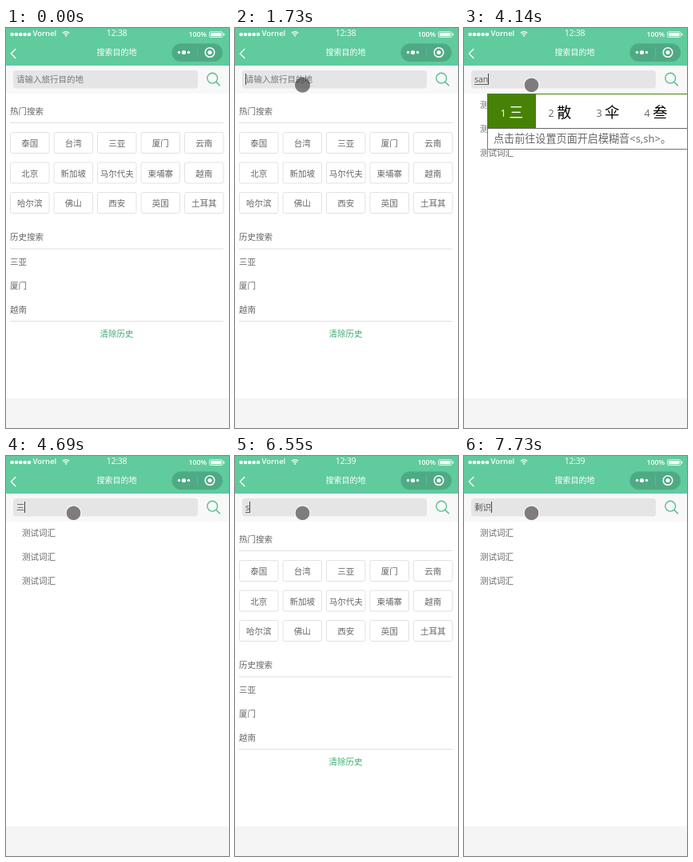
Write an HTML page that moves like this. It is 279 px wide and 500 px high and loops after 8 s.

```html
<!DOCTYPE html>
<html lang="zh-CN">
<head>
<meta charset="utf-8">
<title>搜索目的地</title>
<style>
  html, body { margin: 0; width: 100%; height: 100%; overflow: hidden; background: #fff; }
  svg { display: block; width: 100%; height: 100%; }
  text { font-family: "Open Sans", "Noto Sans CJK SC", "Noto Sans CJK", sans-serif; font-size: 10.5px; fill: #666; }
  .white { fill: #fff; }
  .mid { text-anchor: middle; }
</style>
</head>
<body>
<svg id="stage" viewBox="0 0 279 500"></svg>
<script>
const LOOP = 8000;
const stage = document.getElementById("stage");

function add(parent, tag, attrs = {}, text) {
  const el = document.createElementNS("http://www.w3.org/2000/svg", tag);
  set(el, attrs);
  if (text !== undefined) el.textContent = text;
  parent.appendChild(el);
  return el;
}
function set(el, attrs) {
  for (const key in attrs) el.setAttribute(key, attrs[key]);
}
const group = parent => add(parent, "g");
const rect = (parent, x, y, width, height, fill, more) =>
  add(parent, "rect", { x, y, width, height, fill, ...more });
const dot = (parent, cx, cy, r, more) => add(parent, "circle", { cx, cy, r, fill: "#fff", ...more });
const path = (parent, d, stroke, width, more) =>
  add(parent, "path", { d, stroke, "stroke-width": width, fill: "none", ...more });
const label = (parent, x, y, text, more) => add(parent, "text", { x, y, ...more }, text);
const show = (el, on) => set(el, { visibility: on ? "visible" : "hidden" });

// Page background and header
rect(stage, 0, 0, 279, 500, "#fff");
rect(stage, 0, 463, 279, 37, "#f5f5f5");
rect(stage, 0, 47, 279, 35, "#f8f8f8");
rect(stage, 0, 0, 279, 47, "#60cb9d");

// Status bar
for (let i = 0; i < 5; i++) dot(stage, 7.6 + i * 5.35, 8, 2.3);
label(stage, 33.5, 10.4, "Vornel", { class: "white", style: "font-size:9.5px;font-weight:600" });
path(stage, "M70.8 6.3Q75 2.9 79.2 6.3M72.5 8.1Q75 6.1 77.5 8.1", "#fff", 1.2);
dot(stage, 75, 9.8, 1);
const clock = label(stage, 138.5, 10.2, "", {
  class: "white mid", style: "font-size:10.6px;letter-spacing:-.3px"
});
label(stage, 228.5, 11, "100%", { class: "white", style: "font-size:8.8px;font-weight:600" });
rect(stage, 254.5, 4.7, 16.5, 6.8, "none", { rx: 1.2, stroke: "#fff", "stroke-width": 0.8 });
rect(stage, 256, 6, 13.5, 4.2, "#fff");
rect(stage, 272, 6.7, 1.3, 2.8, "#fff");

// Title bar
path(stage, "M12.3 26L6.3 32L12.3 38", "#fff", 1.3);
label(stage, 138.5, 34.2, "搜索目的地", { class: "white mid", style: "font-size:10px" });
rect(stage, 207.5, 19.5, 63.5, 22.5, "#4eaa84", { rx: 11.25, stroke: "#59b48f", "stroke-width": 0.6 });
path(stage, "M239.5 24V37", "#64b797", 0.8);
dot(stage, 216.5, 30.5, 1.7);
dot(stage, 222.5, 30.5, 2.6);
dot(stage, 228.5, 30.5, 1.7);
dot(stage, 255, 30.5, 5.8, { fill: "none", stroke: "#fff", "stroke-width": 1.5 });
dot(stage, 255, 30.5, 2.6);

// Search field
rect(stage, 9, 53, 231, 22.5, "#e5e5e5", { rx: 4 });
dot(stage, 258.2, 62.7, 6.4, { fill: "none", stroke: "#55bd8d", "stroke-width": 1.4 });
path(stage, "M262.8 67.3L267.8 72.2", "#55bd8d", 1.6);
const placeholder = label(stage, 13, 68, "请输入旅行目的地", { style: "fill:#777" });
const typed = label(stage, 13, 68, "", { style: "fill:#555" });
const underline = path(stage, "", "#555", 0.9);
const caret = rect(stage, 13, 57, 1, 14, "#444");

// Hot and recent searches
const home = group(stage);
const heading = (y, text) => label(home, 5, y, text);
const rule = y => rect(home, 5, y, 267, 1, "#e0e0e0");
heading(107.8, "热门搜索");
rule(118);
"泰国 台湾 三亚 厦门 云南 北京 新加坡 马尔代夫 柬埔寨 越南 哈尔滨 佛山 西安 英国 土耳其"
  .split(" ").forEach((city, i) => {
    const x = 5.5 + (i % 5) * 54.5, y = 130.5 + Math.floor(i / 5) * 37.5;
    rect(home, x, y, 48.5, 26, "#fff", { rx: 2, stroke: "#e2e2e2" });
    label(home, x + 24.2, y + 17.8, city, { class: "mid" });
  });
heading(265.3, "历史搜索");
rule(275.5);
["三亚", "厦门", "越南"].forEach((city, i) => heading(295.5 + i * 30, city));
rule(366);
label(home, 138.5, 386.2, "清除历史", { class: "mid", style: "fill:#3aab70" });

// Suggestions
const results = group(stage);
for (let i = 0; i < 3; i++) label(results, 20, 100.4 + i * 30, "测试词汇");

const pointer = dot(stage, 0, 0, 9.5);

// Input method candidates
const popup = group(stage);
function drawPopup({ x, words, hint }) {
  popup.textContent = "";
  const list = words.split(" ");
  const pitch = 42 + 18 * list[0].length;
  rect(popup, x, 82, 300, 44, "#fff");
  rect(popup, x, 82, 300, 1, "#478206");
  rect(popup, x, 82, pitch + 1, 43, "#478206");
  list.forEach((word, i) => {
    const left = x + i * pitch;
    const num = i ? "#666" : "#fff", ink = i ? "#000" : "#fff";
    label(popup, left + 16.5, 111, i + 1, { style: `font-size:12.5px;fill:${num}` });
    label(popup, left + 27.3, 111.5, word, { style: `font-size:18px;fill:${ink}` });
  });
  if (hint) {
    rect(popup, x + 0.5, 125.5, 300, 26, "#fff", { stroke: "#777" });
    label(popup, x + 8, 143.2, "点击前往设置页面开启模糊音<s,sh>。", { style: "font-size:13.1px;fill:#666" });
  }
  rect(popup, x, 125, 300, 1, "#666");
}

const forS = { x: 21, words: "是 说 上 时" };
const forSa = { x: 29, words: "撒 萨 洒 仨" };
const forSan = { x: 29, words: "三 散 伞 叁", hint: true };
const forSs = { x: 26, words: "剩识 实施 搜索" };

// Each entry changes only the named parts of the state
const events = [
  [0, { text: "", caret: false, list: false, popup: null, time: "12:38" }],
  [1730, { caret: true }],
  [2280, { caret: false }],
  [2740, { caret: true }],
  [3210, { text: "s", list: true }],
  [3910, { popup: forS }],
  [3990, { text: "sa" }],
  [4070, { popup: forSa }],
  [4140, { text: "san", popup: forSan }],
  [4230, { popup: { ...forSan, x: 35 } }],
  [4690, { text: "三", popup: null }],
  [5240, { caret: false }],
  [5790, { caret: true }],
  [5850, { time: "12:39" }],
  [6020, { text: "" }],
  [6080, { list: false }],
  [6550, { text: "s" }],
  [6630, { list: true }],
  [6710, { popup: forS }],
  [7180, { text: "ss", popup: forSs }],
  [7730, { text: "剩识", popup: null }]
];
const stateAt = t => Object.assign({}, ...events.filter(e => e[0] <= t).map(e => e[1]));

// Pointer route as [step, x, y]; it advances in small hops
const route = [[0, 213, 462], [2, 200, 365], [4, 140, 240], [6, 90, 157],
  [8, 66, 110], [10, 82, 82], [13, 84.5, 71.3]];
function pointerAt(t) {
  const step = Math.min(13, Math.floor((t - 410) / 76.9));
  const i = Math.max(1, route.findIndex(p => p[0] >= step));
  const [a, b] = [route[i - 1], route[i]];
  const k = (step - a[0]) / (b[0] - a[0]);
  return [a[1] + (b[1] - a[1]) * k, a[2] + (b[2] - a[2]) * k];
}

let shownPopup = null;
function draw(t) {
  const s = stateAt(t);
  clock.textContent = s.time;
  typed.textContent = s.text;
  const width = s.text ? typed.getComputedTextLength() : 0;
  show(placeholder, !s.text);
  show(caret, s.caret);
  set(caret, { x: Math.round(12.7 + width) });
  set(underline, { d: /[a-z]/.test(s.text) ? `M13 70.5h${width}` : "" });
  show(home, !s.list);
  show(results, s.list);

  show(pointer, t >= 410);
  if (t >= 410) {
    const [cx, cy] = pointerAt(t);
    set(pointer, {
      cx, cy,
      fill: s.text ? "#807c7d" : "rgba(40,38,40,.58)",
      stroke: s.text ? "#fafafa" : "none",
      "stroke-width": 1.2
    });
  }

  show(popup, !!s.popup);
  if (s.popup && s.popup !== shownPopup) drawPopup(s.popup);
  shownPopup = s.popup;
}

const start = performance.now();
function tick() {
  draw((performance.now() - start) % LOOP);
  requestAnimationFrame(tick);
}
tick();
</script>
</body>
</html>
```
